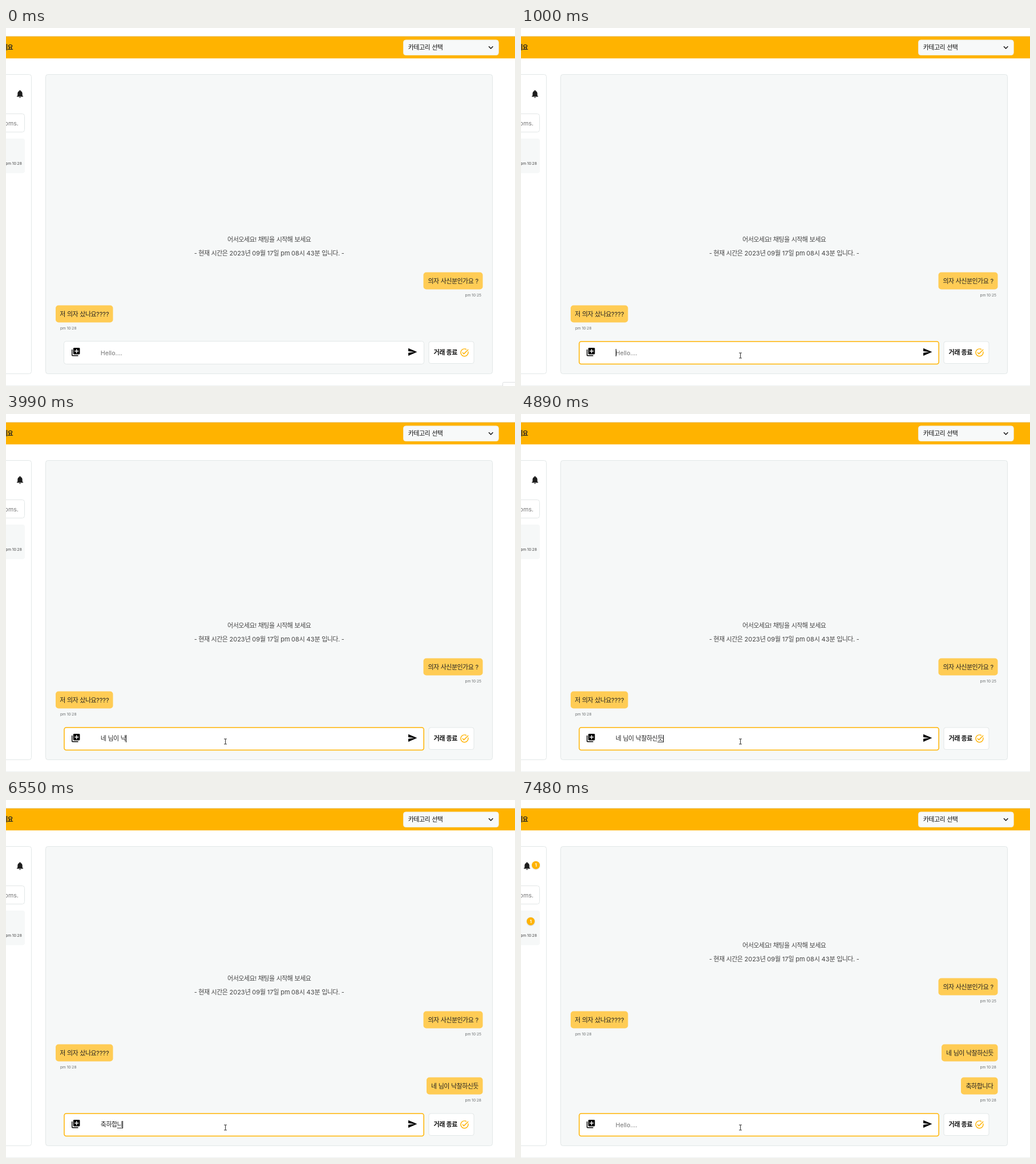
Write an HTML page with a canvas that moves like this. It is 892x628 px and loops after 8 s.

```html
<!DOCTYPE html>
<html lang="ko">
<head>
<meta charset="utf-8">
<title>Chat</title>
<style>
html, body { margin: 0; width: 100%; height: 100%; overflow: hidden; background: #fff; }
canvas { display: block; }
</style>
</head>
<body>
<canvas id="stage" width="892" height="628"></canvas>
<script>
const ctx = document.getElementById('stage').getContext('2d');
const LOOP = 8000;
const AMBER = '#ffb300', BUBBLE = '#ffcc55', PANEL = '#f6f8f8', LINE = '#e2e7e7';
const FONT = 'Inter, "Noto Sans CJK KR", "Noto Sans CJK", sans-serif';
const SIZE = 11;

const ICON = {
  bell: 'M12 22c1.1 0 2-.9 2-2h-4c0 1.1.89 2 2 2zm6-6v-5c0-3.07-1.64-5.64-4.5-6.32V4c0-.83-.67-1.5-1.5-1.5s-1.5.67-1.5 1.5v.68C7.63 5.36 6 7.92 6 11v5l-2 2v1h16v-1l-2-2z',
  add: 'M4 6H2v14c0 1.1.9 2 2 2h14v-2H4V6zm16-4H8c-1.1 0-2 .9-2 2v12c0 1.1.9 2 2 2h12c1.1 0 2-.9 2-2V4c0-1.1-.9-2-2-2zm-1 9h-4v4h-2v-4H9V9h4V5h2v4h4v2z',
  send: 'M2.01 21L23 12 2.01 3 2 10l15 2-15 2z',
  done: 'M22 5.18L10.59 16.6l-4.24-4.24 1.41-1.41 2.83 2.83 10-10L22 5.18zM19.79 10.22C19.92 10.79 20 11.39 20 12c0 4.42-3.58 8-8 8s-8-3.58-8-8 3.58-8 8-8c1.58 0 3.04.46 4.28 1.25l1.44-1.44C16.1 2.67 14.13 2 12 2 6.48 2 2 6.48 2 12s4.48 10 10 10 10-4.48 10-10c0-1.19-.22-2.33-.6-3.39l-1.61 1.61z',
  arrow: 'M0 0V11.5L2.6 9.1 4.3 13 6 12.2 4.4 8.4H8z'
};
for (const k in ICON) ICON[k] = new Path2D(ICON[k]);

const FOCUS = 1000, FIRST_SENT = 5090, SECOND_SENT = 7010;

// [time, field content]; a trailing "|" marks committed text
const TYPING = [
  [0, ''],
  [2320, 'ㄴ'], [2390, '네'], [2450, '네 '], [2520, '네 ㄴ'], [2650, '네 니'],
  [2720, '네 님'], [2790, '네 님ㅇ'], [2860, '네 님이'], [2930, '네 님이 '],
  [3330, '네 님이 ㄴ'], [3400, '네 님이 나'], [3460, '네 님이 낙'],
  [3670, '네 님이 낙ㅊ'], [3990, '네 님이 낙|'], [4060, '네 님이 낙ㅊ'],
  [4140, '네 님이 낙차'], [4210, '네 님이 낙찰'],
  [4410, '네 님이 낙찰ㅎ'], [4480, '네 님이 낙찰하'], [4550, '네 님이 낙찰핫'],
  [4620, '네 님이 낙찰하시'], [4680, '네 님이 낙찰하신'], [4750, '네 님이 낙찰하신ㄷ'],
  [4820, '네 님이 낙찰하신드'], [4890, '네 님이 낙찰하신듯'],
  [FIRST_SENT, ''],
  [5620, 'ㅊ'], [5750, '추'], [5820, '축'], [5890, '축ㅎ'], [5960, '축하'],
  [6030, '축핳'], [6100, '축하하'], [6230, '축하합'], [6420, '축하합ㄴ'],
  [6550, '축하합니'], [6620, '축하합닏'], [6690, '축하합니다'],
  [SECOND_SENT, '']
];

const MESSAGES = [
  { at: 0, text: '의자 사신분인가요 ?', time: 'pm 10:25', x: 731.5, w: 104 },
  { at: 0, text: '저 의자 샀나요????', time: 'pm 10:28', x: 87, w: 100.5, left: true },
  { at: FIRST_SENT, text: '네 님이 낙찰하신듯', time: 'pm 10:28', x: 737, w: 98.5 },
  { at: SECOND_SENT, text: '축하합니다', time: 'pm 10:28', x: 771, w: 64.5 }
];

// Hangul and spaces are set slightly tighter than Latin
function runs(str, size, weight, visit) {
  ctx.font = `${weight} ${size}px ${FONT}`;
  ctx.wordSpacing = `${-0.05 * size}px`;
  let w = 0;
  for (const part of str.match(/[ㄱ-힣]+|[^ㄱ-힣]+/g) || []) {
    ctx.letterSpacing = /[ㄱ-힣]/.test(part) ? `${-0.047 * size}px` : '0px';
    if (visit) visit(part, w);
    w += ctx.measureText(part).width;
  }
  return w;
}

function text(str, x, y, { size = SIZE, color = '#222', weight = 400, align = 0 } = {}) {
  const w = runs(str, size, weight);
  const left = x - w * align;
  ctx.fillStyle = color;
  runs(str, size, weight, (part, dx) => ctx.fillText(part, left + dx, y));
  return w;
}

function box(x, y, w, h, r, fill, stroke, lw = 1) {
  ctx.beginPath();
  ctx.roundRect(x, y, w, h, r);
  if (fill) { ctx.fillStyle = fill; ctx.fill(); }
  if (stroke) { ctx.strokeStyle = stroke; ctx.lineWidth = lw; ctx.stroke(); }
}

function rect(x, y, w, h, color) {
  ctx.fillStyle = color;
  ctx.fillRect(x, y, w, h);
}

function icon(path, x, y, scale, color, outline) {
  ctx.save();
  ctx.translate(x, y);
  ctx.scale(scale, scale);
  ctx.fillStyle = color;
  ctx.fill(path);
  if (outline) { ctx.strokeStyle = outline; ctx.lineWidth = 0.9; ctx.stroke(path); }
  ctx.restore();
}

function badge(x, y) {
  ctx.save();
  ctx.shadowColor = 'rgba(0,0,0,.2)';
  ctx.shadowBlur = 2;
  ctx.shadowOffsetY = 0.7;
  ctx.fillStyle = AMBER;
  ctx.beginPath();
  ctx.arc(x, y, 7, 0, Math.PI * 2);
  ctx.fill();
  ctx.restore();
  text('1', x, y + 2.8, { size: 7.5, color: '#fff', weight: 700, align: 0.5 });
}

function header() {
  rect(0, 14, 892, 1, '#e2e0d8');
  rect(0, 14.8, 892, 38.5, AMBER);
  text('세요', 12.2, 38, { weight: 600, align: 1 });
  box(696.5, 21, 166.7, 26.5, 4, '#f7f9f9', '#f0eee2');
  text('카테고리 선택', 704.7, 37.8, { color: '#111' });
  ctx.strokeStyle = '#111';
  ctx.lineWidth = 1.5;
  ctx.beginPath();
  ctx.moveTo(846, 32.3);
  ctx.lineTo(849.7, 36);
  ctx.lineTo(853.4, 32.3);
  ctx.stroke();
}

function sidebar(unread) {
  box(-20, 81.5, 64.5, 525, 4, '#fff', LINE);
  icon(ICON.bell, unread ? 2.1 : 16.1, 107.2, 0.7, '#1c1c1c');
  box(-20, 150.5, 52.5, 32, 4, '#fff', LINE);
  text('rooms.', 21.8, 171, { size: 10.6, color: '#757575', align: 1 });
  box(-20, 194, 53, 60.5, 4, PANEL);
  text('pm 10:28', 27.8, 240, { size: 6.7, color: '#444', align: 1 });
  if (unread) {
    badge(26, 114.2);
    badge(17, 212.8);
  }
}

function chat(t) {
  box(69.5, 81.5, 783, 525, 4, PANEL, LINE);
  const shown = MESSAGES.filter(m => t >= m.at);
  const top = 486.5 - 58 * (shown.length - 1);
  const intro = { color: '#444', align: 0.5 };
  text('어서오세요! 채팅을 시작해 보세요', 461.2, top - 54, intro);
  text('- 현재 시간은 2023년 09월 17일 pm 08시 43분 입니다. -', 461.2, top - 30, intro);
  shown.forEach((m, i) => {
    const y = top + 58 * i;
    box(m.x, y, m.w, 30, 5, BUBBLE);
    text(m.text, m.x + m.w / 2 + 0.2, y + 19, { align: 0.5 });
    text(m.time, m.left ? 95 : 833, y + 42.3, { size: 6.7, color: '#6b6f70', align: m.left ? 0 : 1 });
  });
}

function caretOn(t, since) {
  return t >= FOCUS && Math.floor((t - since) / 500) % 2 === 0;
}

function field(t) {
  if (t >= FOCUS) box(102, 550, 630.2, 39.4, 3.5, '#fff', AMBER, 1.5);
  else box(101.5, 549.5, 631, 40, 4, '#fff', LINE);
  icon(ICON.add, 113.6, 559.6, 0.72, '#000');
  icon(ICON.send, 703.6, 559.6, 0.73, '#000');

  const [at, raw] = TYPING.findLast(step => t >= step[0]);
  const value = raw.replace('|', '');
  let caret = 165.8;
  if (value) {
    const w = text(value, caret, 573.3);
    if (/[ㄱ-힣]$/.test(raw)) {
      const last = runs(value.slice(-1), SIZE, 400);
      rect(caret + w - last, 575, last, 1, '#333');
    }
    caret += w;
  } else {
    text('Hello....', caret, 573.5, { size: 10.7, color: '#757575' });
  }
  const blink = at === 0 ? 985 : at === SECOND_SENT ? 6980 : t;
  if (caretOn(t, blink)) rect(Math.round(caret - 0.3), 563, 1, 13, '#000');

  box(741, 550, 79, 38.5, 3.5, '#fff', LINE);
  text('거래 종료', 749.6, 572.8, { color: '#111', weight: 600 });
  icon(ICON.done, 794.8, 560.7, 0.72, AMBER);
}

function pointer(t) {
  if (t < 230) return;
  const step = Math.min(10, Math.floor((t - 230) / 70));
  const p = step / 10;
  const k = p * p * (3 - 2 * p);
  const x = 875 + (384.5 - 875) * k;
  const y = 621 + (574.5 - 621) * k;
  if (x > 700) {
    icon(ICON.arrow, x, y, 0.9, '#fff', '#000');
    return;
  }
  ctx.strokeStyle = '#333';
  ctx.lineWidth = 1;
  ctx.beginPath();
  for (const s of [-1, 1]) {
    ctx.moveTo(x - 2.5, y + 4.5 * s);
    ctx.lineTo(x + 2.5, y + 4.5 * s);
  }
  ctx.moveTo(x, y - 4.5);
  ctx.lineTo(x, y + 4.5);
  ctx.stroke();
}

function draw(t) {
  rect(0, 0, 892, 628, '#fff');
  const unread = (t >= 5160 && t < 5900) || t >= 7080;
  header();
  sidebar(unread);
  chat(t);
  field(t);
  rect(0, 627, 892, 1, '#edf0f0');
  if (t < 300) box(870.5, 621.5, 40, 20, 2, '#fff', '#dcdfe0');
  pointer(t);
}

function tick() {
  draw(performance.now() % LOOP);
  requestAnimationFrame(tick);
}
tick();
</script>
</body>
</html>
```
